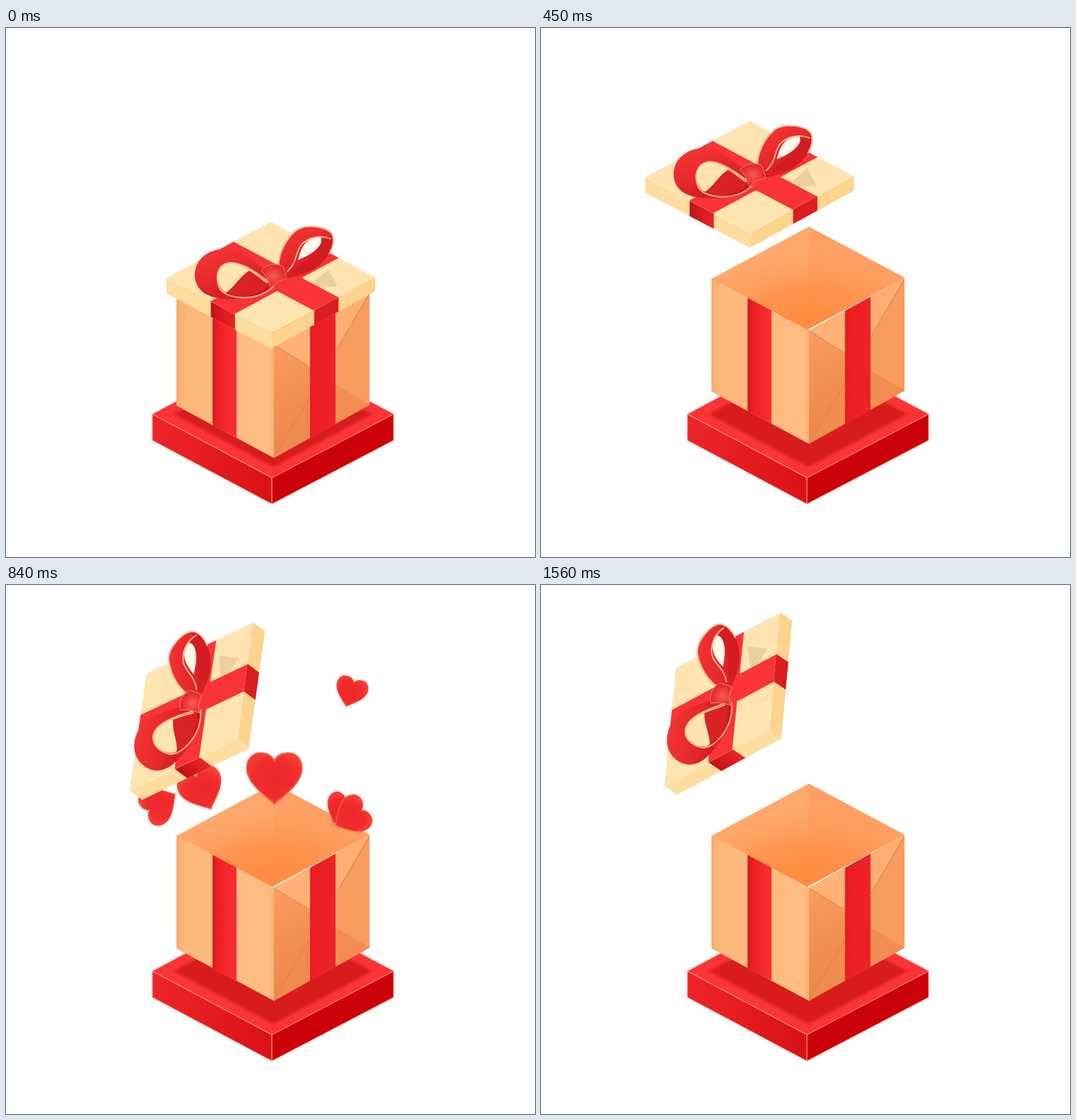
An HTML page for the animation above (1.62 s loop, 748 px wide and 748 px high).

```html
<!DOCTYPE html>
<html lang="en">
<head>
<meta charset="utf-8">
<title>Gift box</title>
<style>
  html, body { margin: 0; height: 100%; overflow: hidden; background: #fff; }
  svg { display: block; width: 100vw; height: 100vh; }
  .trim { fill: none; stroke: #ffbd94; stroke-width: 1.8; stroke-linecap: round; }
  .edge { stroke: #ff9c7c; vector-effect: non-scaling-stroke; }
  .fold { fill: none; stroke: #d9824d; vector-effect: non-scaling-stroke; }
</style>
</head>
<body>
<!-- Every face is drawn on its own plane, 100 units along each sloping edge. -->
<svg viewBox="0 0 748 748">
  <defs>
    <linearGradient id="plinthLeft"><stop stop-color="#ee2528"/><stop offset="1" stop-color="#d91116"/></linearGradient>
    <linearGradient id="wallLeft"><stop stop-color="#f6ad70"/><stop offset=".1" stop-color="#fdb87a"/><stop offset=".94" stop-color="#ffbd83"/><stop offset="1" stop-color="#f9b174"/></linearGradient>
    <linearGradient id="wallRight" x2="0" y2="1"><stop stop-color="#f89d60"/><stop offset="1" stop-color="#ee8548"/></linearGradient>
    <linearGradient id="bandLeft"><stop stop-color="#dd181c"/><stop offset=".35" stop-color="#f02427"/><stop offset="1" stop-color="#fa2f31"/></linearGradient>
    <linearGradient id="bandRight"><stop stop-color="#ea1b1f"/><stop offset="1" stop-color="#ee2428"/></linearGradient>
    <linearGradient id="lipBand"><stop stop-color="#c31018"/><stop offset="1" stop-color="#ea2628"/></linearGradient>
    <linearGradient id="loop" x2=".7" y2="1"><stop stop-color="#f83838"/><stop offset=".55" stop-color="#e6282b"/><stop offset="1" stop-color="#c3161c"/></linearGradient>
    <radialGradient id="knot"><stop stop-color="#fa5a50"/><stop offset="1" stop-color="#df2529"/></radialGradient>
    <radialGradient id="glow" cx=".9" cy=".9" r=".9"><stop stop-color="#ff8a3e"/><stop offset=".45" stop-color="#ff8f46" stop-opacity=".8"/><stop offset="1" stop-color="#ff9a58" stop-opacity="0"/></radialGradient>
    <radialGradient id="heartFill"><stop stop-color="#ec2629"/><stop offset=".75" stop-color="#f02c2d"/><stop offset="1" stop-color="#f63a34"/></radialGradient>
    <filter id="soft"><feGaussianBlur stdDeviation="1"/></filter>
    <path id="heart" d="M0 36C-10 26-39 8-39-14C-39-28-30-36-20-36C-9-36-3-31 0-25C3-31 9-36 20-36C30-36 39-28 39-14C39 8 10 26 0 36Z" fill="url(#heartFill)" stroke="#ff5840" stroke-width="2"/>
  </defs>

  <g id="plinth">
    <g transform="matrix(1.715 .91 -1.7 .91 377 455)">
      <rect class="edge" width="100" height="100" fill="#fb3437"/>
      <rect x="9" y="9" width="82" height="82" fill="#d81c1f" filter="url(#soft)"/>
    </g>
    <rect class="edge" transform="matrix(1.69 .9 0 1 207 546)" width="100" height="37" fill="url(#plinthLeft)"/>
    <rect class="edge" transform="matrix(1.72 -.9 0 1 376 636)" width="100" height="37" fill="#cb0209"/>
  </g>

  <g id="box">
    <g transform="matrix(1.35 .72 -1.38 .74 379 281)">
      <rect width="100" height="100" fill="#fea063"/>
      <path fill="#ffa86d" d="M0 0V100H100Z"/>
      <rect width="100" height="100" fill="url(#glow)"/>
    </g>
    <g transform="matrix(1.38 .74 0 1 241 354)">
      <rect width="100" height="160" fill="url(#wallLeft)"/>
      <rect x="37" width="24.6" height="160" fill="url(#bandLeft)"/>
    </g>
    <g transform="matrix(1.35 -.75 0 1 379 428)">
      <rect width="100" height="160" fill="url(#wallRight)"/>
      <path fill="#ffb176" d="M0 0H38V60Z"/>
      <path fill="#ee8b4e" d="M38 101L0 159H38Z"/>
      <path fill="#fdae73" d="M64 0H100L64 58Z"/>
      <path fill="#f99c60" d="M100 0V160L64 104V58Z"/>
      <path fill="#f38d53" d="M64 104L100 160H64Z"/>
      <path class="fold" d="M100 3L64 58M38 101L1 157M1 2L38 60"/>
      <rect x="37.8" width="26.6" height="160" fill="url(#bandRight)"/>
    </g>
  </g>

  <g id="hearts"></g>

  <g id="lid">
    <g transform="matrix(1.48 .785 -1.475 .795 374.3 274)">
      <rect width="100" height="100" fill="#ffe4b2"/>
      <path fill="#ead09a" d="M77 42L90 26L70 15Z"/>
      <path fill="#fa3436" d="M0 35.5H100V59H0ZM42 0H65V100H42Z"/>
    </g>
    <g transform="matrix(1.49 .785 0 1 227 354)">
      <rect width="100" height="21.5" fill="#fedd9f"/>
      <rect x="42" width="23" height="21.5" fill="url(#lipBand)"/>
    </g>
    <g transform="matrix(1.46 -.8 0 1 376 432)">
      <rect width="100" height="20.5" fill="#fcd48e"/>
      <rect x="41" width="23.5" height="20.5" fill="#d91d21"/>
    </g>

    <path fill="url(#loop)" d="M372 346C352 332 334 313 308 312C284 314 266 328 267 352C269 372 285 382 312 383C340 384 362 378 378 366Z"/>
    <path fill="#ffe4b2" d="M370 361C350 343 330 331 315 332C300 335 296 350 301 362C304 370 308 374 313 374C328 368 345 352 370 361Z"/>
    <path fill="#d92126" d="M306 377C322 370 328 353 344 343L374 362C358 378 330 384 312 382Z"/>
    <path class="trim" d="M374 361C350 342 330 330 315 332C299 335 295 352 302 368C310 383 352 389 378 366M345 342L369 360"/>

    <path fill="url(#loop)" d="M385 346C382 326 393 302 410 287C424 277 452 280 461 291C467 304 458 324 440 338C424 349 408 352 395 354Z"/>
    <path fill="#d21c22" d="M461 293C450 297 444 300 440 311C430 326 416 334 402 346C425 345 444 335 457 319C463 310 464 300 461 293Z"/>
    <path fill="#fff7ea" d="M445 295C430 295 418 304 413 328C428 322 443 313 446 302Z"/>
    <path class="trim" d="M386 338C384 322 395 299 410 286C424 277 452 280 461 291C465 301 462 311 457 319M398 344C413 330 408 318 418 306C428 296 444 292 459 298"/>

    <path fill="url(#knot)" stroke="#f2806a" d="M361 343C369 333 384 332 392 338C394 346 397 350 396 355C388 356 378 361 374 367C371 358 368 350 361 343Z"/>
  </g>
</svg>
<script>
const LOOP = 1620, STEP = 30;
const $ = id => document.getElementById(id);
const progress = (t, from, to) => Math.min(1, Math.max(0, (t - from) / (to - from)));
const smooth = p => p * p * (3 - 2 * p);
const easeOut = (p, power) => 1 - (1 - p) ** power;
const mix = (a, b, p) => a + (b - a) * p;

// Hearts shoot out of the box, slow down towards (x, y) and bow their path by `bend`.
const SOURCE = { x: 378, y: 400 };
const hearts = [
  { x: 194, y: 340, bend: -130, start: 585, rate: 8, fade: 1130, width: 54, turn: -122 },
  { x: 264, y: 275, bend: 0, start: 575, rate: 8, fade: 1030, width: 63, turn: -24 },
  { x: 500, y: 282, bend: 25, start: 650, rate: 8, fade: 1130, width: 46, turn: 28 },
  { x: 380, y: 220, bend: 15, start: 672, rate: 8, fade: 1130, width: 78, turn: 0 },
  { x: 512, y: 368, bend: -125, start: 628, rate: 8, fade: 1030, width: 54, turn: 60 },
  { x: 535, y: 100, bend: -85, start: 575, rate: 4.5, fade: 1130, width: 45, turn: 18 }
];
for (const heart of hearts) {
  heart.node = document.createElementNS("http://www.w3.org/2000/svg", "use");
  heart.node.setAttribute("href", "#heart");
  $("hearts").append(heart.node);
}

function drawHeart(h, t) {
  const e = 1 - Math.exp(-h.rate * Math.max(0, t - h.start) / 1000);
  const x = mix(SOURCE.x, h.x, e);
  const y = mix(SOURCE.y, h.y, e) + h.bend * e * (1 - e ** 3);
  const scale = h.width / 78 * mix(0.5, 1, easeOut(progress(t, 540, 840), 4));
  h.node.setAttribute("transform", `translate(${x} ${y}) rotate(${h.turn}) scale(${scale})`);
  h.node.setAttribute("opacity", progress(t, 600, 706) * (1 - progress(t, h.fade, h.fade + 360)));
}

// The lid rises in a straight line, then drifts with a slight sag while it tips back.
function drawLid(t) {
  const p = progress(t, 0, 540), rise = p * p * (2 - p);
  const drift = easeOut(progress(t, 540, 1200), 2);
  const x = mix(374.5, 276.5, rise) - 20 * drift;
  const y = mix(353, 177, rise) - 15.5 * drift + 28 * drift * (1 - drift);
  const angle = -56 * easeOut(progress(t, 450, 1060), 3);
  $("lid").setAttribute("transform", `translate(${x} ${y}) rotate(${angle}) translate(-374.5 -353)`);
}

function draw(t) {
  $("box").setAttribute("transform", `translate(0 ${mix(20, 0, smooth(progress(t, 0, 240)))})`);
  drawLid(t);
  hearts.forEach(h => drawHeart(h, t));
}

function tick() {
  draw(Math.floor(performance.now() % LOOP / STEP) * STEP);
  requestAnimationFrame(tick);
}
tick();
</script>
</body>
</html>
```
